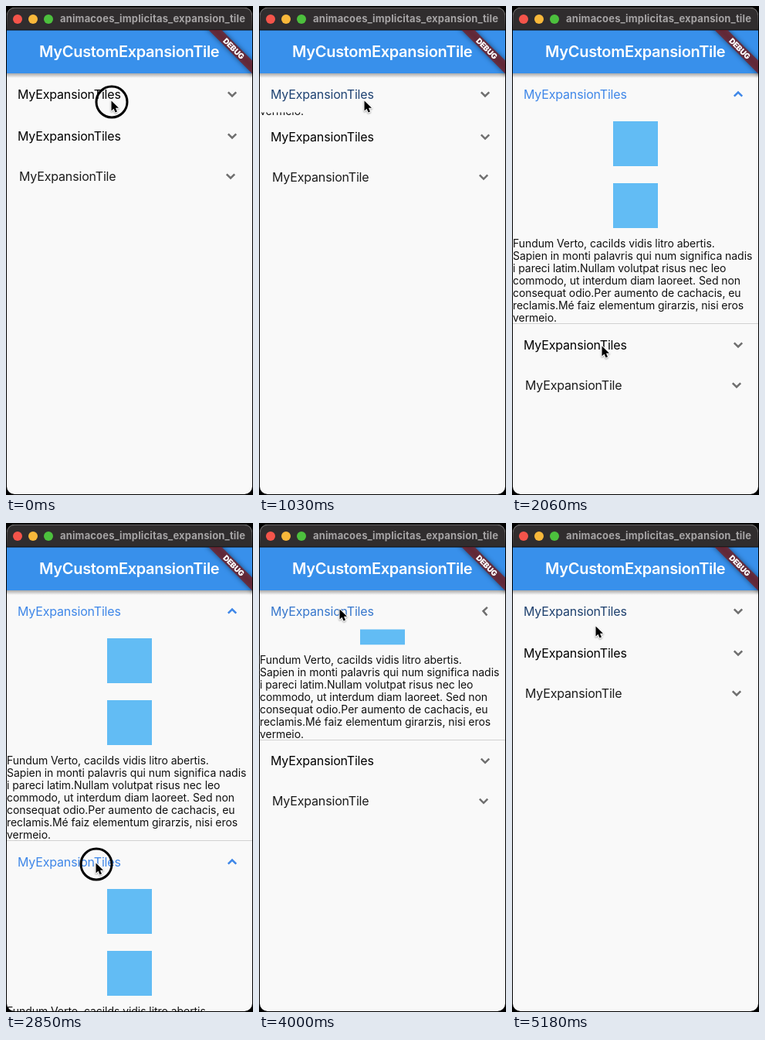
Recreate the animation shown at these times as an HTML page with a canvas. Size 320x632 px, loop 5.21 s.

```html
<!DOCTYPE html>
<html lang="pt">
<head>
<meta charset="utf-8">
<title>Expansion tiles</title>
<style>
  html, body { margin: 0; width: 100%; height: 100%; overflow: hidden; background: #000; }
  canvas { display: block; width: 320px; height: 632px; }
</style>
</head>
<body>
<canvas id="stage"></canvas>
<script>
const LOOP = 5210, WIDTH = 320, HEIGHT = 632;
const SIZE_MS = 250, COLOR_MS = 350, PRESS_MS = 130;
const BLUE = [63, 135, 232], GREY = '#6f6f6f';
const SANS = 'Inter, "Open Sans", sans-serif';
const BODY = [
  'Fundum Verto, cacilds vidis litro abertis.',
  'Sapien in monti palavris qui num significa nadis',
  'i pareci latim.Nullam volutpat risus nec leo',
  'commodo, ut interdum diam laoreet. Sed non',
  'consequat odio.Per aumento de cachacis, eu',
  'reclamis.Mé faiz elementum girarzis, nisi eros',
  'vermeio.'
];

// Each time flips a tile between closed and open.
const FIRST_TOGGLES = [270, 782, 1310, 3880, 4408, 4927];
const SECOND_TOGGLES = [2200, 2920];
const PRESSES = [...FIRST_TOGGLES, ...SECOND_TOGGLES];

// Pointer stops: time, x, y
const POINTER = [
  [0, 136, 122], [1480, 136, 122], [1980, 116, 439], [3020, 116, 439],
  [3520, 105, 120], [3640, 105, 120], [3800, 104, 111],
  [4960, 104, 111], [5150, 108, 133], [LOOP, 108, 133]
];

const canvas = document.getElementById('stage');
const ctx = canvas.getContext('2d');
const ratio = window.devicePixelRatio || 1;
canvas.width = WIDTH * ratio;
canvas.height = HEIGHT * ratio;

const smooth = u => u * u * (3 - 2 * u);

function progress(toggles, time, duration, curve = u => u) {
  const count = toggles.filter(start => start <= time).length;
  if (!count) return 0;
  const u = curve(Math.min(1, (time - toggles[count - 1]) / duration));
  return count % 2 ? u : 1 - u;
}

function text(string, x, y, font, color, spacing = 0, align = 'left') {
  ctx.font = `${font} ${SANS}`;
  ctx.letterSpacing = spacing + 'px';
  ctx.textAlign = align;
  ctx.fillStyle = color;
  ctx.fillText(string, x, y);
}

function rect(x, y, w, h, color) {
  ctx.fillStyle = color;
  ctx.fillRect(x, y, w, h);
}

function disc(x, y, radius, color) {
  ctx.fillStyle = color;
  ctx.beginPath();
  ctx.arc(x, y, radius, 0, 2 * Math.PI);
  ctx.fill();
}

function trace(points) {
  ctx.beginPath();
  points.forEach(([x, y]) => ctx.lineTo(x, y));
}

function chevron(x, y, turn, color) {
  ctx.save();
  ctx.translate(x, y);
  ctx.rotate(turn * Math.PI);
  trace([[-5.2, -2.6], [0, 2.5], [5.2, -2.6]]);
  ctx.lineWidth = 2.5;
  ctx.strokeStyle = color;
  ctx.stroke();
  ctx.restore();
}

// Draws a tile whose title is centred on y and returns the next title's y.
function tile(y, toggles, time) {
  const open = progress(toggles, time, SIZE_MS);
  const tint = progress(toggles, time, COLOR_MS, u => u * u);
  const isOpen = toggles.filter(start => start <= time).length % 2 === 1;
  const blue = `rgb(${BLUE.join()})`;
  const next = y + 54 + 270 * open;

  text('MyExpansionTiles', 15, y + 6, '400 16px',
    `rgb(${BLUE.map(c => c * tint).join()})`, -0.17);
  chevron(293, y, open, isOpen ? blue : GREY);

  if (open > 0) {
    const top = y + 23.5;
    const bottom = next - 28 + 2 * (1 - open);
    ctx.save();
    ctx.beginPath();
    ctx.rect(1, top, 318, bottom - top + 1);
    ctx.clip();
    for (const offset of [232, 152]) rect(131, bottom - offset - 29, 58, 58, '#62bcf4');
    BODY.forEach((line, i) =>
      text(line, 1, bottom - 98 + 16 * i, '400 14px', '#111', -0.06));
    rect(1, Math.round(bottom), 318, 1, `rgba(0,0,0,${0.16 * Math.min(1, open * 3)})`);
    ctx.restore();
  }
  return next;
}

function debugBanner() {
  ctx.save();
  ctx.beginPath();
  ctx.rect(1, 31, 318, 600);
  ctx.clip();
  ctx.translate(319, 31);
  ctx.rotate(Math.PI / 4);
  ctx.filter = 'blur(3px)';
  rect(-44, 28, 88, 12, 'rgba(0,0,0,.5)');
  ctx.filter = 'none';
  rect(-40, 28, 80, 12, 'rgba(120,28,32,.75)');
  text('DEBUG', 0, 37.6, '900 10px', '#fff', -0.2, 'center');
  ctx.restore();
}

function appBar() {
  const shadow = ctx.createLinearGradient(0, 87, 0, 93);
  shadow.addColorStop(0, 'rgba(0,0,0,.32)');
  shadow.addColorStop(1, 'rgba(0,0,0,0)');
  rect(1, 87, 318, 6, shadow);
  rect(1, 31, 318, 56, '#3890eb');
  text('MyCustomExpansionTile', 159.7, 66, '600 20px', '#fff', -0.32, 'center');
}

function titleBar() {
  rect(1, 2, 318, 29, '#302d2e');
  rect(1, 30.5, 318, 1, '#0c0c0c');
  disc(15, 17, 6, '#f4544a');
  disc(35, 17, 6, '#f8b83a');
  disc(55, 17, 6, '#4cc03d');
  text('animacoes_implicitas_expansion_tile', 70, 21, '700 13px', '#a6a4a5', 0.15);
}

function windowRim() {
  const rim = ctx.createLinearGradient(0, 2, 0, 30);
  rim.addColorStop(0, 'rgba(255,255,255,.28)');
  rim.addColorStop(1, 'rgba(255,255,255,0)');
  ctx.beginPath();
  ctx.roundRect(1.5, 2.5, 317, 628, 9.5);
  ctx.lineWidth = 1;
  ctx.strokeStyle = rim;
  ctx.stroke();
}

function pointer(time) {
  const i = POINTER.findIndex(stop => stop[0] > time);
  const [t0, x0, y0] = POINTER[i - 1], [t1, x1, y1] = POINTER[i];
  const u = smooth((time - t0) / (t1 - t0));
  ctx.save();
  ctx.translate(x0 + (x1 - x0) * u, y0 + (y1 - y0) * u);

  const pressed = time < FIRST_TOGGLES[0] ||
    PRESSES.some(up => time >= up - PRESS_MS && time < up);
  if (pressed) {
    ctx.beginPath();
    ctx.arc(1, 2, 20, 0, 2 * Math.PI);
    ctx.lineWidth = 3;
    ctx.strokeStyle = '#000';
    ctx.stroke();
  }

  trace([[0.5, 0.5], [0.5, 13.5], [3.5, 10.8], [5.6, 15.5],
         [8, 14.5], [6, 9.8], [10, 9.8]]);
  ctx.closePath();
  ctx.lineJoin = 'round';
  ctx.lineWidth = 2;
  ctx.strokeStyle = '#fff';
  ctx.shadowColor = 'rgba(0,0,0,.35)';
  ctx.shadowBlur = 2 * ratio;
  ctx.shadowOffsetY = ratio;
  ctx.stroke();
  ctx.shadowColor = 'transparent';
  ctx.fillStyle = '#000';
  ctx.fill();
  ctx.restore();
}

function draw(time) {
  ctx.setTransform(ratio, 0, 0, ratio, 0, 0);
  rect(0, 0, WIDTH, HEIGHT, '#000');
  ctx.save();
  ctx.beginPath();
  ctx.roundRect(1, 2, 318, 629, 10);
  ctx.clip();
  rect(1, 2, 318, 629, '#f9f9f9');

  const second = tile(114, FIRST_TOGGLES, time);
  const third = tile(second, SECOND_TOGGLES, time) - 2;
  text('MyExpansionTile', 17, third + 6, '400 16px', '#1c1c1c', -0.17);
  chevron(291, third, 0, GREY);

  appBar();
  titleBar();
  debugBanner();
  windowRim();
  ctx.restore();
  pointer(time);
}

function tick() {
  draw(performance.now() % LOOP);
  requestAnimationFrame(tick);
}
tick();
</script>
</body>
</html>
```
